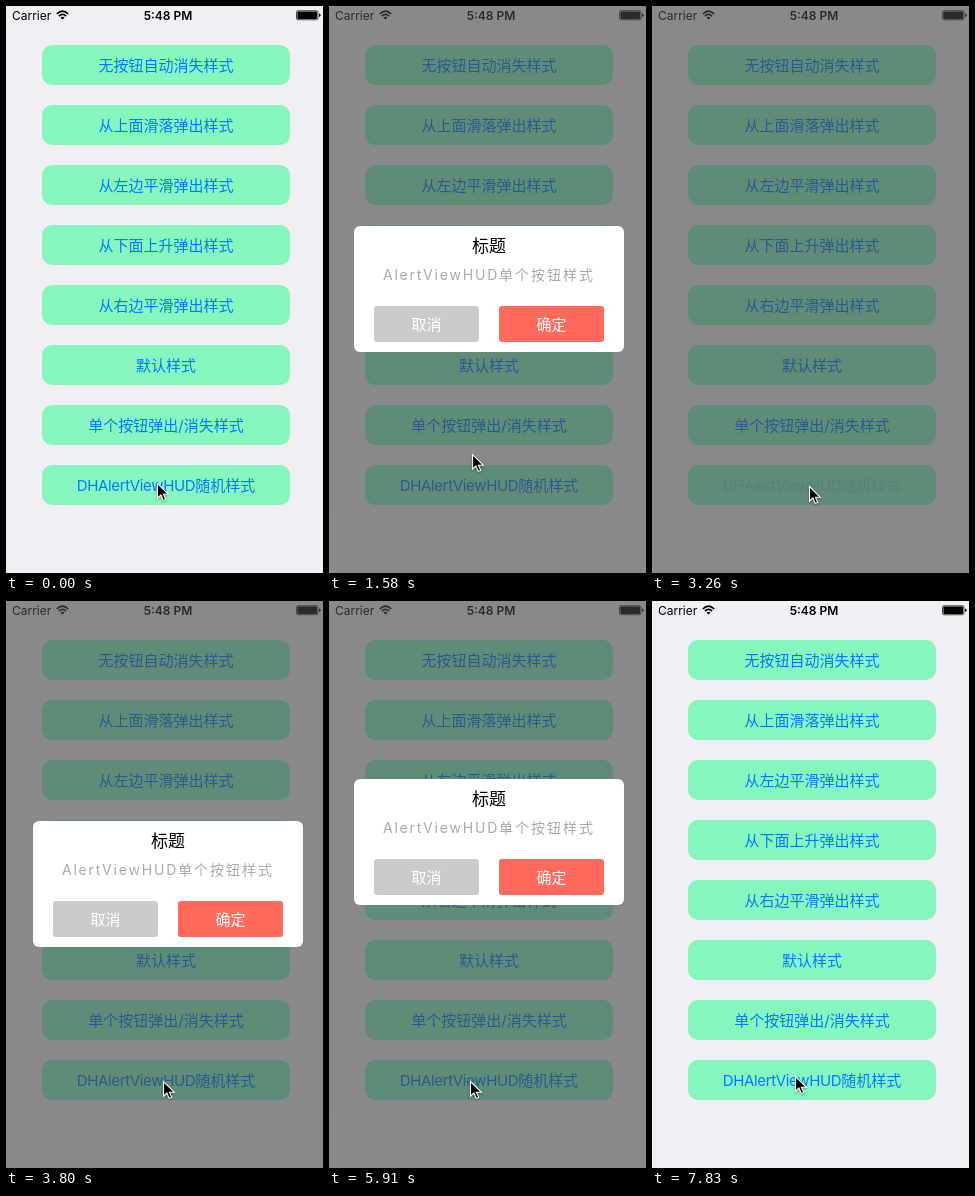
An HTML page for the animation above (8000 ms loop, 317 by 567 pixels).

```html
<!DOCTYPE html>
<html lang="zh-CN">
<head>
<meta charset="utf-8">
<title>Alert styles</title>
<style>
  html, body { margin: 0; width: 100%; height: 100%; overflow: hidden; }
  body {
    position: relative; background: #efeff4; color: #000;
    font-family: Inter, "Noto Sans CJK SC", "Noto Sans CJK", sans-serif;
  }
  div, svg { position: absolute; }
  div { white-space: nowrap; text-align: center; }
  i { font-style: normal; letter-spacing: -.32px; }
  .bar { top: 0; height: 19px; font-size: 12px; line-height: 19px; }
  .item {
    left: 36px; width: 248px; height: 40px; border-radius: 10px;
    background: #86f5be; color: #007aff; font-size: 15px; line-height: 41px;
  }
  #dim { inset: 0; background: rgba(70, 70, 70, .6); }
  #card { left: 25px; top: 220px; width: 270px; height: 126px; border-radius: 6px; background: #fff; }
  #title { top: 8px; width: 100%; font-size: 17px; font-weight: 500; line-height: 24px; }
  #msg { top: 38px; width: 100%; font-size: 14px; line-height: 21px; color: #aaa; letter-spacing: 2px; }
  #msg i { letter-spacing: 1.8px; }
  .btn {
    top: 80px; width: 105px; height: 36px; border-radius: 3px;
    color: #fff; font-size: 15px; line-height: 37px;
  }
  #cancel { left: 20px; }
  #ok { left: 145px; background: #ff6a5c; }
  #cursor { left: 0; top: 0; overflow: visible; }
</style>
</head>
<body>
<div class="bar" style="left:6px">Carrier</div>
<svg style="left:50px;top:4px" width="13" height="10" fill="none" stroke="#000" stroke-width="1.7">
  <path d="M.8 4Q6.5-1.6 12.2 4M2.9 6.2Q6.5 2.7 10.1 6.2"/>
  <path d="M6.5 9.6L4.5 7.7Q6.5 5.9 8.5 7.7Z" fill="#000" stroke="none"/>
</svg>
<div class="bar" style="left:112px;width:100px;font-weight:600">5:48 PM</div>
<svg style="left:290px;top:4px" width="26" height="11">
  <rect x=".5" y=".75" width="21.5" height="9" rx="1.6" fill="none" stroke="#000" stroke-width=".7"/>
  <rect x="1.4" y="1.6" width="19.7" height="7.3" rx=".8"/>
  <path d="M23 3.6Q24.6 4 24.6 5.25T23 6.9Z"/>
</svg>
<main id="list"></main>
<div id="dim"></div>
<div id="card">
  <div id="title">标题</div>
  <div id="msg"><i>AlertViewHUD</i>单个按钮样式</div>
  <div id="cancel" class="btn">取消</div>
  <div id="ok" class="btn">确定</div>
</div>
<svg id="cursor" width="14" height="20">
  <path d="M.5.5V15.2L3.9 12 6.2 17.4 8.7 16.4 6.4 11.2H11.2Z" fill="#000" stroke="#fff"
    stroke-width="1.1" style="filter:drop-shadow(0 1px 1px rgba(0,0,0,.35))"/>
</svg>
<script>
const LOOP = 8000, TICK = 88.5;
const labels = ['无按钮自动消失样式', '从上面滑落弹出样式', '从左边平滑弹出样式', '从下面上升弹出样式',
  '从右边平滑弹出样式', '默认样式', '单个按钮弹出/消失样式', 'DHAlertViewHUD随机样式'];

// press: list button goes down; open/close: alert; tap: cancel goes down; lead: spring head start
const alerts = [
  { press: 500, open: 680, tap: 2100, close: 2280, dx: 0, dy: 348, lead: 0 },
  { press: 3090, open: 3260, tap: 4500, close: 4680, dx: 295, dy: 0, lead: 0 },
  { press: 5560, open: 5730, tap: 6860, close: 7040, dx: 0, dy: -346, lead: 90 }
];

// pointer legs: first step, last step, x, y
const home = [151, 477];
const legs = [
  [1490, 2010, 113, 330], [2280, 2730, 155, 478], [2910, 2910, 157, 480],
  [3970, 4060, 149, 456], [4150, 4240, 90, 308], [4860, 5470, 141, 480],
  [6610, 6780, 108, 318], [7490, 7830, 143, 475]
];

const $ = id => document.getElementById(id);
const ease = p => p * p * (3 - 2 * p);
const ticks = ms => Math.floor(ms / TICK + .02);

$('list').innerHTML = labels.map((text, n) =>
  `<div class="item" style="top:${39 + 60 * n}px"><span>${text.replace(/[A-Za-z]+/, '<i>$&</i>')}</span></div>`
).join('');
const lastLabel = $('list').lastChild.firstChild;

// critically damped spring: share of the way still to go
function remaining(ms) {
  const k = 13.7 * ms / 1000;
  return (1 + k) * Math.exp(-k);
}

function pointer(t) {
  let [x, y] = home;
  for (const [from, to, nx, ny] of legs) {
    if (t < from) break;
    const steps = Math.round((to - from) / TICK) + 1;
    const p = t >= to ? 1 : ease(Math.min(1, (ticks(t - from) + 1) / steps));
    x += (nx - x) * p;
    y += (ny - y) * p;
  }
  return [Math.round(x), Math.round(y)];
}

function draw(t) {
  const a = alerts.find(a => t >= a.press && t < a.close);
  const shown = !!a && t >= a.open;
  const display = shown ? 'block' : 'none';
  $('dim').style.display = $('card').style.display = display;

  let ink = a ? .2 : 1;
  if (shown) {
    const age = ticks(t - a.open) * TICK;
    const rest = remaining(age + a.lead);
    ink = Math.min(1, .2 + .8 * (age + a.lead) / 270);
    $('card').style.transform = `translate(${Math.round(a.dx * rest)}px, ${Math.round(a.dy * rest)}px)`;
    $('cancel').style.background = t >= a.tap ? '#989898' : '#cbcbcb';
  }
  lastLabel.style.opacity = ink;

  const [x, y] = pointer(t);
  $('cursor').style.transform = `translate(${x}px, ${y}px)`;
}

const start = performance.now();
function frame() {
  draw((performance.now() - start) % LOOP);
  requestAnimationFrame(frame);
}
frame();
</script>
</body>
</html>
```
